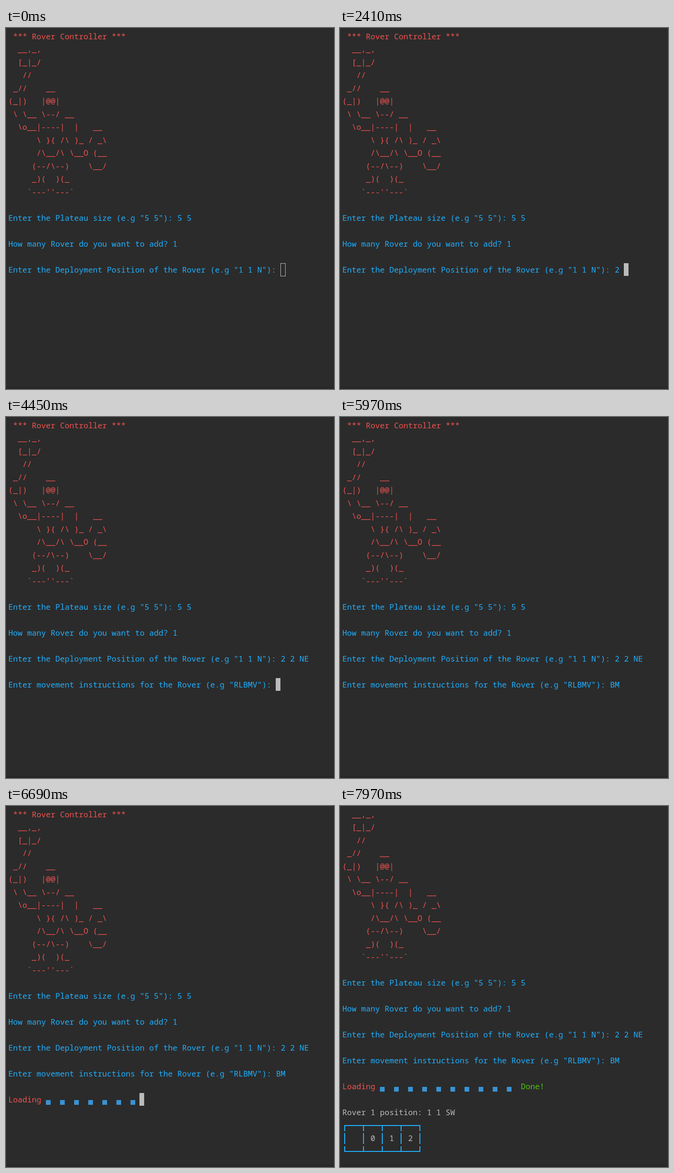
Write an HTML page that moves like this. It is 698 px wide and 766 px high and loops after 8000 ms.

```html
<!DOCTYPE html>
<html lang="en">
<head>
<meta charset="utf-8">
<title>Rover Controller</title>
<style>
  html, body { margin: 0; width: 100%; height: 100%; overflow: hidden; background: #2b2b2b; }
  body { position: relative; }
  #screen { position: absolute; left: 4px; top: 4px; }
  .row {
    position: absolute; height: 27px; white-space: pre; text-indent: 1px;
    font: calc(10px / .6)/27px "Noto Sans Mono", "DejaVu Sans Mono", monospace;
    font-variant-ligatures: none;
  }
  .red { color: #f0524f; }
  .blue { color: #1fb0ff; }
  .green { color: #4fc414; }
  .grey { color: #bbb; }
  .block { position: absolute; top: 15px; width: 9.5px; height: 10px; background: #3993d4; }
  #caret { position: absolute; width: 10px; height: 27px; background: #bbb; }
  #caret.idle { width: 11px; height: 28px; box-sizing: border-box; background: none; border: 1px solid #bbb; }
  #grid { position: absolute; left: 0; top: 664px; overflow: visible; fill: none; stroke: #1fb0ff; stroke-width: 2; }
  #mouse { position: absolute; left: 0; top: 0; fill: #fff; stroke: #000; }
  #edge { position: absolute; left: 0; right: 0; top: 761px; bottom: 0; background: #272727; }
</style>
</head>
<body>
<div id="screen"><div id="caret"></div></div>
<svg id="grid" width="180" height="83"><path/></svg>
<svg id="mouse" width="15" height="22" viewBox="0 0 13 20"><path d="M.5 .5V16.5L4.3 13L6.8 19L9.2 18L6.7 12H12Z"/></svg>
<div id="edge"></div>
<script>
const LOOP = 8000, COL = 10, ROW = 27.5;
const $ = id => document.getElementById(id);
const screen = $('screen'), caret = $('caret'), grid = $('grid'), mouse = $('mouse');
const rows = [];

// Terminal rows snap to whole pixels.
const rowTop = n => Math.floor(n * ROW) + 'px';

function addRow(n, color, text = '', col = 0) {
  const el = document.createElement('div');
  el.className = 'row ' + color;
  el.style.left = col * COL + 'px';
  el.textContent = text;
  screen.insertBefore(el, caret);
  rows.push({ el, n });
  return el;
}

String.raw` *** Rover Controller ***
  __,_,
  [_|_/
   //
 _//    __
(_|)   |@@|
 \ \__ \--/ __
  \o__|----|  |   __
      \ }{ /\ )_ / _\
      /\__/\ \__O (__
     (--/\--)    \__/
     _)(  )(_
    ~---''---~`.replace(/~/g, '`').split('\n').forEach((line, n) => addRow(n, 'red', line));

addRow(14, 'blue', 'Enter the Plateau size (e.g "5 5"): 5 5');
addRow(16, 'blue', 'How many Rover do you want to add? 1');

const PLACE = 'Enter the Deployment Position of the Rover (e.g "1 1 N"): ';
const MOVE = 'Enter movement instructions for the Rover (e.g "RLBMV"): ';
const place = addRow(18, 'blue'), move = addRow(20, 'blue');
const loading = addRow(22, 'red', 'Loading');
const bar = addRow(22, 'red');
const done = addRow(22, 'green', 'Done!', 38);
const report = addRow(24, 'grey', 'Rover 1 position: 1 1 SW');
const heads = addRow(26, 'grey');

const blocks = Array.from({ length: 10 }, (_, i) => {
  const el = document.createElement('div');
  el.className = 'block';
  el.style.left = (8 + 3 * i) * COL + 1 + 'px';
  return bar.appendChild(el);
});

// Each step changes part of the state; caret is [column, row].
const steps = [[0, {
  place: '', move: null, caret: [58, 18], idle: true, mouse: null,
  loading: false, blocks: 0, done: false, report: false, cells: 0, scroll: 0
}]];
const at = (time, change) => steps.push([time, change]);

[130, 200, 270, 350, 420, 490].forEach((t, i) => {
  const k = i / 5;
  at(t, { mouse: [644 - 40 * k, 735 - 229 * k] });
});
at(750, { mouse: [589, 491], idle: false });
at(890, { mouse: [594, 496] });
at(990, { mouse: [604, 504] });
at(1090, { mouse: null });
at(1750, { caret: null });
[2210, 2410, 2680, 2820, 3170, 3370].forEach((t, i) =>
  at(t, { place: '2 2 NE'.slice(0, i + 1), caret: [59 + i, 18] }));
at(4370, { caret: null });
at(4450, { move: '', caret: [57, 20] });
at(4910, { move: 'B', caret: [58, 20] });
at(5110, { move: 'BM', caret: [59, 20] });
at(5970, { caret: null });
at(6030, { loading: true, caret: [7, 22] });
[6100, 6240, 6330, 6420, 6510, 6600, 6690, 6820, 6950].forEach((t, i) =>
  at(t, { blocks: i + 1, caret: [10 + 3 * i, 22] }));
at(7090, { blocks: 10, done: true, caret: [0, 24] });
at(7620, { report: true, caret: [0, 25] });
at(7690, { cells: 2, caret: null, scroll: 1 });
at(7820, { cells: 3 });
at(7970, { cells: 4 });

const show = (el, on) => { el.style.visibility = on ? 'visible' : 'hidden'; };

function gridPath(cells) {
  const right = 10 + 40 * cells;
  let d = `M9 14H${right + 1}M9 69H${right + 1}`;
  for (let x = 10; x <= right; x += 40) d += `M${x} 14V26M${x} 30V53M${x} 58V69`;
  return d;
}

function draw(s) {
  rows.forEach(({ el, n }) => {
    el.style.top = rowTop(n - s.scroll);
    show(el, n >= s.scroll);
  });
  place.textContent = PLACE + s.place;
  move.textContent = s.move === null ? '' : MOVE + s.move;
  show(loading, s.loading);
  blocks.forEach((b, i) => show(b, i < s.blocks));
  show(done, s.done);
  show(report, s.report);

  show(grid, s.cells);
  if (s.cells) grid.firstChild.setAttribute('d', gridPath(s.cells));
  heads.textContent = s.cells ? '      ' + ['0', '1', '2'].slice(0, s.cells - 1).join('   ') : '';

  show(caret, s.caret);
  caret.className = s.idle ? 'idle' : '';
  if (s.caret) {
    caret.style.left = s.caret[0] * COL + 'px';
    caret.style.top = rowTop(s.caret[1]);
  }
  show(mouse, s.mouse);
  if (s.mouse) mouse.style.transform = `translate(${s.mouse[0]}px, ${s.mouse[1]}px)`;
}

const start = performance.now();
let last = 0;
function tick() {
  const t = (performance.now() - start) % LOOP;
  const past = steps.filter(([time]) => time <= t);
  if (past.length !== last) {
    last = past.length;
    draw(Object.assign({}, ...past.map(p => p[1])));
  }
  requestAnimationFrame(tick);
}
tick();
</script>
</body>
</html>
```
